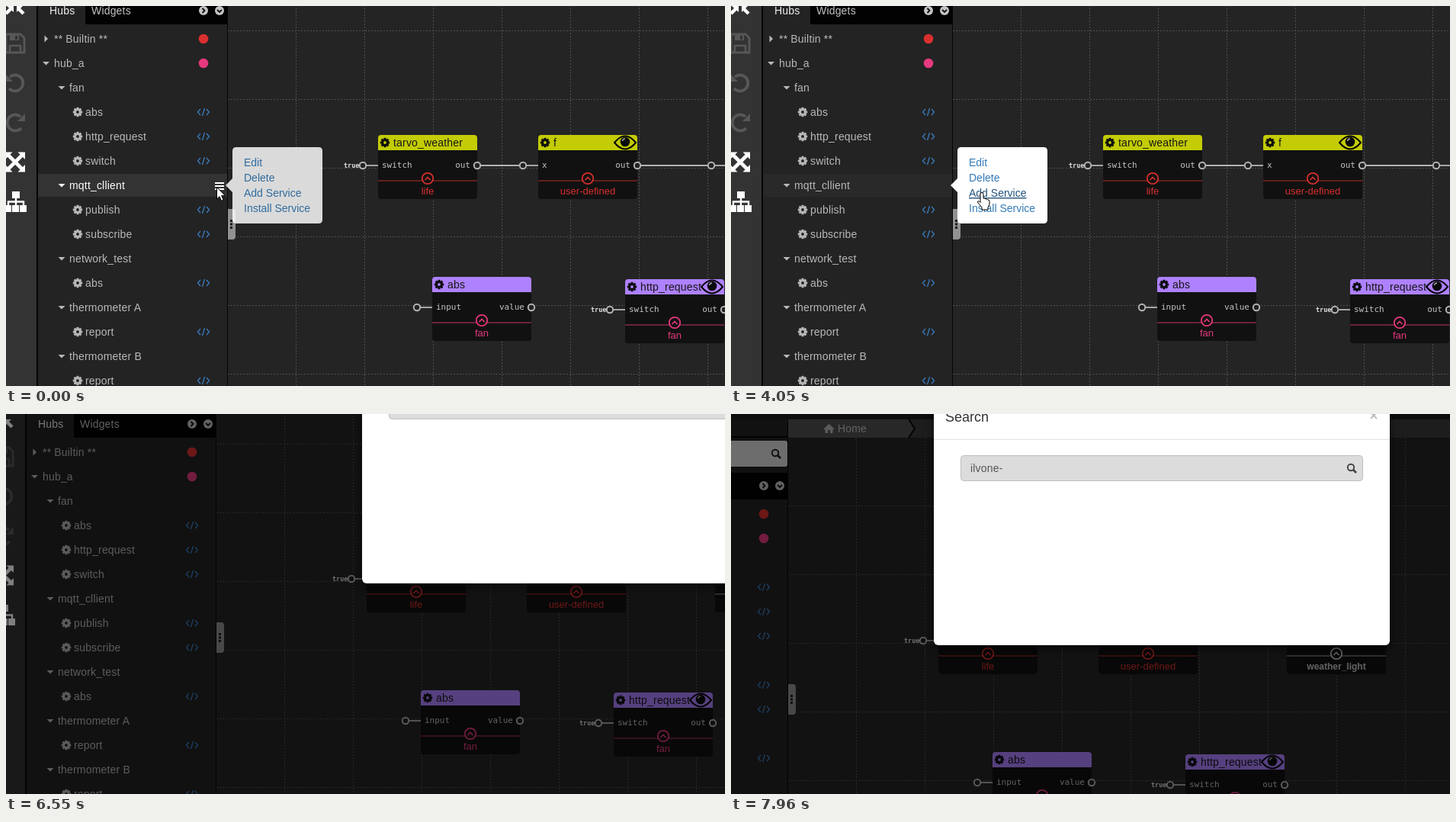
Animation of 943x498 px, one loop 8 s. Source, as an HTML page:

```html
<!DOCTYPE html>
<html>
<head>
<meta charset="utf-8">
<style>
html, body { margin: 0; width: 100%; height: 100%; overflow: hidden; background: #111; }
svg { display: block; width: 943px; height: 498px; }
text { font: 14px "Liberation Sans", Arial, sans-serif; white-space: pre; }
.ui { letter-spacing: .18px; }
.mono { font: 11px "DejaVu Sans Mono", monospace; fill: #c4c4c4; }
.flag { font: bold 8.5px "DejaVu Sans Mono", monospace; fill: #e0e0e0; }
.kind { font-size: 13px; text-anchor: middle; }
.bold { font-size: 12px; font-weight: bold; }
.link { fill: #337ab7; }
.link.on { fill: #23527c; text-decoration: underline; }
#modal { filter: drop-shadow(0 4px 6px rgba(0,0,0,.6)); }
</style>
</head>
<body>
<svg id="stage" viewBox="0 0 943 498"></svg>
<script>
const RED = '#d9302f', PINK = '#e6397f', YELLOW = '#c3cc05', PURPLE = '#ae81ff', GRAY = '#b8b8b8';

const rect = (x, y, w, h, fill, more = '') =>
  `<rect x="${x}" y="${y}" width="${w}" height="${h}" fill="${fill}" ${more}/>`;
const text = (x, y, s, fill, cls = 'ui', more = '') =>
  `<text x="${x}" y="${y}" fill="${fill}" class="${cls}" ${more}>${s}</text>`;
const disc = (x, y, r, fill, more = '') => `<circle cx="${x}" cy="${y}" r="${r}" fill="${fill}" ${more}/>`;
const line = (d, color, w = 2, more = '') =>
  `<path d="${d}" fill="none" stroke="${color}" stroke-width="${w}" ${more}/>`;
const shape = (d, fill, more = '') => `<path d="${d}" fill="${fill}" ${more}/>`;
const at = (x, y, s) => `<g transform="translate(${x} ${y})">${s}</g>`;

function gear(x, y, color) {
  let teeth = '';
  for (let a = 0; a < 360; a += 45) teeth += rect(-1.5, -6.2, 3, 3, color, `transform="rotate(${a})"`);
  return at(x, y, teeth + disc(0, 0, 3.3, 'none', `stroke="${color}" stroke-width="2.8"`));
}
const lens = (x, y, color) => at(x, y,
  disc(-1, -1, 4.2, 'none', `stroke="${color}" stroke-width="2"`) + line('M2 2L6 6', color, 2.6));
const code = y => at(259, y, line('M-4 -4L-7.5 0L-4 4M4 -4L7.5 0L4 4M1.5 -5L-1.5 5', '#3a7cbd', 1.3));
const port = (x, y) => disc(x, y, 4.2, '#222', 'stroke="#b4b4b4" stroke-width="2"');
const wire = (a, b, y) => line(`M${a} ${y}H${b}`, '#b4b4b4', 1.8);
const eye = (x, y) => at(x, y,
  line('M-14 0Q0 -17 14 0Q0 17 -14 0Z', '#000', 2) + disc(0, -1, 6.3, '#0a0a0a') +
  line('M-3.5 -2Q-3 -5 0 -5', '#aaa', 1.4));

function caret(x, y, open, id = '') {
  return shape(open ? `M${x - 4.5} ${y - 2}h9l-4.5 4.5z` : `M${x - 2} ${y - 4.5}v9l4.5 -4.5z`, '#b9b9b9', id);
}

function node(x, y, o) {
  const cx = x + 65, py = y + 40;
  return rect(x, y, 130, 84, '#111', 'rx="4"') +
    shape(`M${x} ${y + 20}v-16q0 -4 4 -4h122q4 0 4 4v16z`, o.head) +
    gear(x + 9, y + 10, '#0c0c0c') + text(x + 20, y + 15, o.name, '#161616') +
    rect(x, y + 59, 130, 2, o.color, 'opacity=".42"') +
    disc(cx, y + 57, 7.2, '#111', `stroke="${o.color}" stroke-width="1.8"`) +
    line(`M${cx - 3.5} ${y + 59}l3.5 -3.5l3.5 3.5`, o.color, 1.6) +
    text(cx, y + 78, o.kind, o.color, 'kind ' + (o.cls || '')) +
    text(x + 5, y + 43, o.input, '#c4c4c4', 'mono') +
    text(x + 121, y + 43, o.output, '#c4c4c4', 'mono', 'text-anchor="end"') +
    (o.eye ? eye(x + 114, y + 10) : '') +
    wire(x - 16, x, py) + port(x - 20, py) + port(x + 130, py) +
    (o.flag ? text(x - 45, py + 3, 'true', '#e0e0e0', 'flag') : '');
}

function canvas() {
  let grid = '';
  for (let x = 380.5; x < 1200; x += 90) grid += `M${x} -57V500`;
  for (let y = -57.5; y < 500; y += 90) grid += `M291 ${y}H1200`;
  return rect(291, -57, 900, 560, '#242424') + line(grid, '#505050', 1, 'stroke-dasharray="2 2"') +
    wire(622, 674, 209) + wire(832, 921, 209) +
    node(488, 169, { name: 'tarvo_weather', head: YELLOW, color: RED, kind: 'life', input: 'switch', output: 'out', flag: 1 }) +
    node(698, 169, { name: 'f', head: YELLOW, color: RED, kind: 'user-defined', input: 'x', output: 'out', eye: 1 }) +
    node(945, 169, { name: 'light', head: GRAY, color: '#c8c8c8', kind: 'weather_light', cls: 'bold', input: 'in', output: 'out' }) +
    node(559, 355, { name: 'abs', head: PURPLE, color: PINK, kind: 'fan', input: 'input', output: 'value' }) +
    node(812, 358, { name: 'http_request', head: PURPLE, color: PINK, kind: 'fan', input: 'switch', output: 'out', flag: 1, eye: 1 });
}

function topBar() {
  return rect(-20, -130, 1300, 49, '#1a1a1a') + rect(291, -81, 900, 24, '#3a3a3a') +
    shape('M291 -81H449L457 -69L449 -57H291Z', '#505050') +
    line('M449 -81L457 -69L449 -57', '#050505', 2) +
    shape('M337.5 -68.5L344.5 -75L351.5 -68.5L350.5 -67.5L349.5 -68V-63H346V-67H343V-63H339.5V-68L338.5 -67.5Z', GRAY) +
    text(356, -64, 'Home', '#c4c4c4');
}

function toolbar() {
  const off = '#575757', on = '#fff';
  const arrow = s => line(`M0 0L${9 * s[0]} ${9 * s[1]}`, on, 4.6) +
    shape(`M${13 * s[0]} ${13 * s[1]}h${-9.5 * s[0]}l${9.5 * s[0]} ${-9.5 * s[1]}z`, on);
  const turn = 'M-7 -8A10.5 10.5 0 1 1 -8 7';
  const head = shape('M-13 -12V-2H-3Z', off);
  return rect(-20, -81, 60, 600, '#333') + rect(40, -81, 2, 600, '#050505') +
    line('M0 10L7 3M23 10L16 3', on, 4.5) + shape('M1 0H10V8ZM22 0H14V8Z', on) +
    at(12, 49, line('M-12 -12H7L12 -7V12H-12Z', off, 2.8) + rect(-7, -12, 12, 8, off) +
      rect(0, -10, 3, 5, '#333') + line('M-7 12V3H7V12', off, 2.6)) +
    at(12, 101, line(turn, off, 3.8) + head) +
    at(12, 153, `<g transform="scale(-1 1)">${line(turn, off, 3.8) + head}</g>`) +
    at(12, 204.5, [[1, 1], [1, -1], [-1, 1], [-1, -1]].map(arrow).join('')) +
    at(13, 257, rect(-5, -14, 10, 9, on) + line('M0 -6V5M-10 5V-0.5H10V5', on, 2.4) +
      [-15, -5, 5].map(x => rect(x, 4, 9, 9, on)).join(''));
}

// level, label, kind of right-hand mark
const rows = [[0, '** Builtin **', RED], [0, 'hub_a', PINK], [1, 'fan'], [2, 'abs'], [2, 'http_request'],
  [2, 'switch'], [1, 'mqtt_cllient'], [2, 'publish'], [2, 'subscribe'], [1, 'network_test'], [2, 'abs'],
  [1, 'thermometer A'], [2, 'report'], [1, 'thermometer B'], [2, 'report']];

function sidebar() {
  let s = rect(42, -81, 248, 600, '#232323') + rect(290, -81, 1, 600, '#050505') +
    rect(42, -59, 248, 2, '#050505') + rect(42, -53, 248, 34, '#dcdcdc', 'rx="3"') + lens(275, -36, '#222') +
    rect(42, -11, 248, 35, '#020202') + rect(42, -11, 62, 35, '#232323') +
    text(57, 11, 'Hubs', '#f0f0f0') + text(112, 11, 'Widgets', '#c4c4c4') +
    disc(259, 6, 6, '#c4c4c4') + line('M257.5 3L260.5 6L257.5 9', '#111', 1.9) +
    disc(280, 6, 6, '#c4c4c4') + line('M277 5L280 8L283 5', '#111', 1.9) +
    rect(42, 220, 248, 30, '#292929', 'id="band"');
  rows.forEach(([level, label, dot], i) => {
    const y = 43 + 32 * i, x = [63, 83, 104][level], live = i === 6;
    s += text(x, y + 5, label, '#b9b9b9', 'ui', live ? 'id="rowText"' : '');
    s += level === 2 ? gear(94, y, '#b9b9b9') + code(y)
      : caret(level ? 73 : 52.5, y, i > 0, live ? 'id="rowCaret"' : '');
    if (dot) s += disc(259, y, 6.3, dot);
  });
  return s + `<g id="burger">${[231, 235, 239].map(y => rect(274, y, 12, 2, '#fff')).join('')}</g>`;
}

function handle() {
  return shape('M291 266h6q4 0 4 4v32q0 4 -4 4h-6z', '#929292') +
    [281, 285.5, 290].map(y => rect(294, y - 1, 3, 3, '#1a1a1a')).join('');
}

function popover() {
  return shape('M302 185H410q5 0 5 5V280q0 5 -5 5H302q-5 0 -5 -5V244L288 235L297 226V190q0 -5 5 -5Z', '#fff') +
    ['Edit', 'Delete', 'Add Service', 'Install Service']
      .map((s, i) => text(312, 210 + 20 * i, s, '', 'link', `id="link${i}"`)).join('') +
    rect(311.5, 256.5, 89, 17, 'none', 'id="focus" stroke="#23527c" stroke-dasharray="1 1"');
}

function dialog() {
  return rect(482, -111, 598, 326, '#fff', 'rx="6"') + rect(482, -55, 598, 1, '#e2e2e2') +
    text(497, -78, 'Search', '#333', '', 'style="font-size:18px"') +
    line('M1055 -90L1063 -82M1063 -90L1055 -82', '#bdbdbd', 2) +
    rect(517.5, -33.5, 527, 33, '#dcdcdc', 'rx="4" stroke="#bdbdbd"') +
    text(530, -12, 'ilvone-', '#555', 'ui', 'id="query"') + lens(1030, -17, '#444') +
    '<g id="glow">' + [.24, .16, .08].map((o, i) => rect(517, i, 528, 1, '#d9604a', `opacity="${o}"`)).join('') + '</g>';
}

const edge = 'stroke="#000" stroke-width="1" stroke-linejoin="round"';
document.getElementById('stage').innerHTML =
  `<g id="world">${canvas() + topBar() + toolbar() + sidebar() + handle()}
  <g id="menu">${popover()}</g>
  ${rect(-300, -200, 1700, 900, '#000', 'id="dim"')}
  <g id="modal">${dialog()}</g></g>
  ${shape('M.5 .5V16L4 12.6L6.6 18.4L9.2 17.2L6.7 11.6H11.4Z', '#fff', `id="arrow" ${edge}`)}
  ${shape('M4 2.5Q4 .5 6 .5Q8 .5 8 2.5V8Q10 7.2 11 9Q13 8.3 13.5 10Q16 9.5 16 12V16L14 20V23H6V20L1 14Q-.5 10.8 2.5 12L4 13.5Z', '#fff', `id="hand" ${edge}`)}`;

const $ = {};
document.querySelectorAll('[id]').forEach(e => $[e.id] = e);

// [time, value, ...]: each pose holds until the next one
const pointer = [[0, 276, 237], [550, 298, 249], [710, 312, 261], [830, 322, 267], [950, 326, 267],
  [1200, 297, 250], [1350, 284, 236], [1480, 273, 227], [1620, 274, 228], [1750, 276, 229], [1890, 278, 231],
  [2260, 279, 231], [3660, 294, 233], [3780, 306, 235], [3900, 312, 235], [4050, 323, 244],
  [4170, 326, 250], [4290, 330, 258], [4410, 333, 263], [4530, 335, 265]];
const menuFade = [[0, .83], [120, 1], [710, .7], [830, .3], [950, 0], [3160, .6], [3290, 1], [5220, 0]];
const dimFade = [[0, 0], [5220, .3], [5370, .5]];
const pan = [[0, 0, 0], [6550, -15, 7], [6690, -58, 27], [6870, -106, 49], [7040, -143, 61], [7250, -173, 71],
  [7440, -196, 79], [7600, -206, 83], [7780, -212, 86], [7960, -216, 88]];

const pose = (keys, t) => keys.reduce((a, k) => t >= k[0] ? k : a);
const show = (el, on) => el.setAttribute('visibility', on ? 'visible' : 'hidden');
const move = (el, x, y) => el.setAttribute('transform', `translate(${x} ${y})`);

function draw(t) {
  const [, px, py] = pose(pointer, t), [, wx, wy] = pose(pan, t);
  move($.world, wx, wy);
  move($.arrow, px, py);
  move($.hand, px, py);
  show($.arrow, t < 4050);
  show($.hand, t >= 4050 && t < 5220);

  const hover = t < 550 || (t >= 1350 && t < 3660);
  $.band.setAttribute('fill', hover ? '#333' : t < 5220 ? '#292929' : '#232323');
  $.rowText.setAttribute('fill', hover ? '#fff' : '#b9b9b9');
  $.rowCaret.setAttribute('fill', hover ? '#fff' : '#b9b9b9');
  show($.burger, hover);

  $.menu.setAttribute('opacity', pose(menuFade, t)[1]);
  $.link2.classList.toggle('on', t >= 4050 && t < 4290);
  $.link3.classList.toggle('on', t >= 4290);
  show($.focus, t >= 4940);

  $.dim.setAttribute('opacity', pose(dimFade, t)[1]);
  show($.modal, t >= 5370);
  $.modal.setAttribute('opacity', t < 5670 ? .85 : 1);
  move($.modal, 0, t < 5670 ? -40 : 0);
  show($.glow, t >= 5670 && t < 6550);
  show($.query, t >= 6550);
}

const start = performance.now();
function tick() {
  draw((performance.now() - start) % 8000);
  requestAnimationFrame(tick);
}
tick();
</script>
</body>
</html>
```
